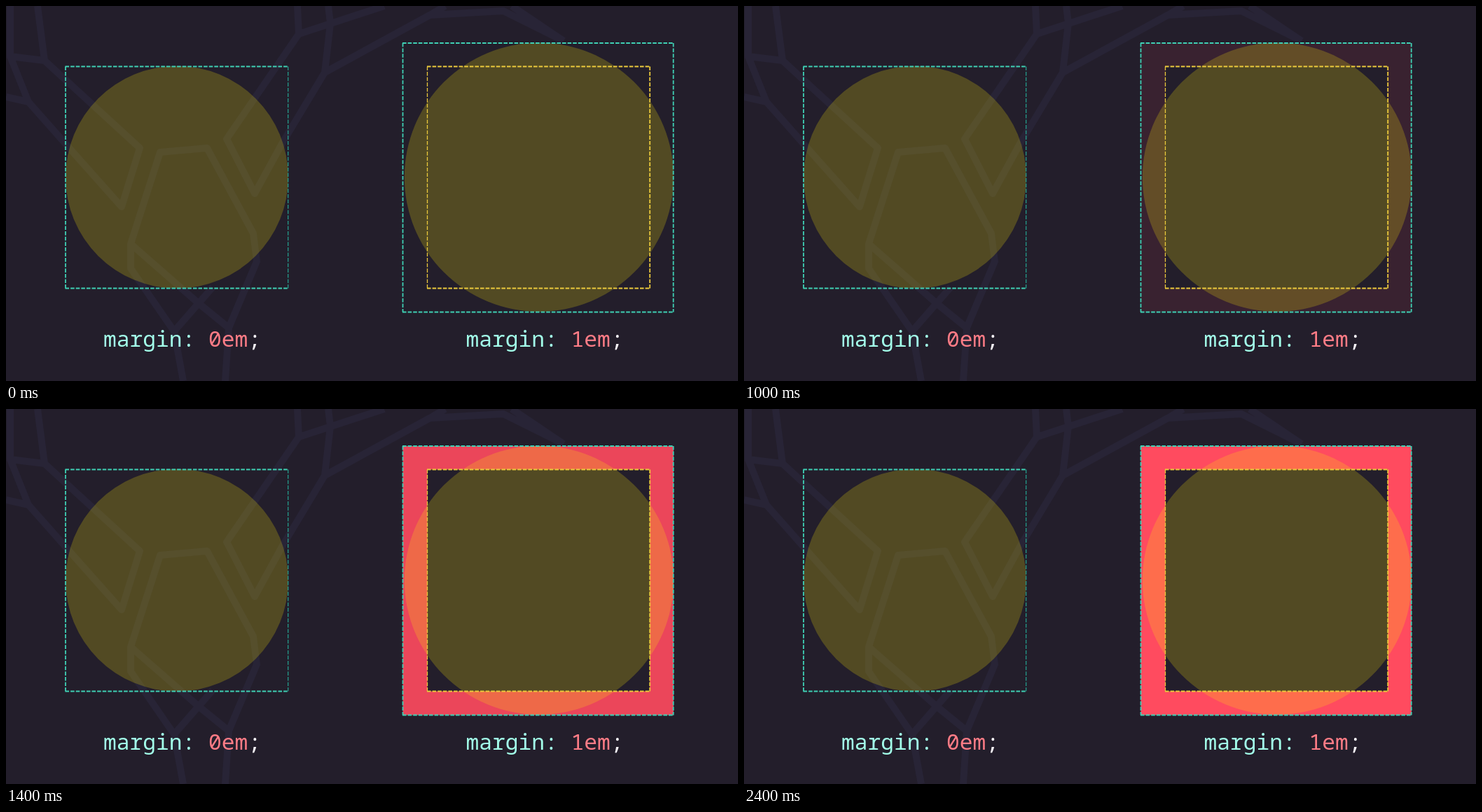
Write an HTML page that moves like this. It is 1045 px wide and 536 px high and loops after 3.4 s.

```html
<!DOCTYPE html>
<html lang="en">
<head>
<meta charset="utf-8">
<title>Margin and shape</title>
<style>
  html, body { margin: 0; width: 100%; height: 100%; overflow: hidden; background: #231e2b; }
  svg { display: block; width: 100%; height: 100%; }
  .web { fill: none; stroke: #282436; stroke-width: 10; stroke-linejoin: round; }
  .shape { fill: #f8e60a; fill-opacity: .22; }
  .edge { fill: none; stroke-width: 1.8; stroke-dasharray: 5.6 2; }
  .outer { stroke: #3fd0b4; }
  .inner { stroke: #ecca3c; }
  .thin { stroke-width: 1.3; }
  text { font: 350 31.25px "Roboto Mono", "Noto Sans Mono", monospace; fill: #a3ffea; white-space: pre; }
  .value { fill: #ff7c86; }
  .end { fill: #f4f1f6; }
</style>
</head>
<body>
<svg viewBox="0 0 1045 536" preserveAspectRatio="none">
  <path class="web" d="M6 0V72L55 78L45 0M6 72L32 137L0 130M32 137L85 197L165 287L191 203L55 78
    M416 0L418 40L540 0M418 40L315 190L355 268L395 195L455 95L463 25L460 0
    M455 95L605 13L627 0M605 13L710 7L796 50M722 0L796 50
    M178 340L220 209L287 203L353 325L358 365L318 460L275 425L178 340V375L240 465L295 402
    M240 465L253 536M318 460L313 536"/>

  <path id="margin" fill="#ff4b5f" fill-rule="evenodd" opacity="0"
    d="M566.5 53H953V437.5H566.5ZM601.5 86.5V403.5H919V86.5Z"/>

  <circle class="shape" cx="244" cy="244.7" r="159"/>
  <circle class="shape" cx="761" cy="244.7" r="192.2"/>

  <path class="edge outer" d="M84.5 86.5H403M84.5 403.5H403M85 86.5V403.5"/>
  <path class="edge thin" stroke="#259a89" d="M402.7 86.5V403.5"/>
  <path class="edge outer" d="M566 53H953.5M566 437.5H953.5M566.5 53V437.5M952.7 53V437.5"/>
  <path class="edge inner" d="M601 86.5H919.5M601 403.5H919.5M919.2 86.5V403.5"/>
  <path class="edge inner thin" d="M601.5 86.5V403.5"/>

  <text x="139" y="486.5">margin: <tspan class="value">0em</tspan><tspan class="end">;</tspan></text>
  <text x="656.5" y="486.5">margin: <tspan class="value">1em</tspan><tspan class="end">;</tspan></text>
</svg>
<script>
  const duration = 3400;
  // [time in ms, opacity held until the next step]
  const steps = [[0, 0], [1000, .1], [1200, .4], [1400, .91], [1600, 1], [duration, 1]];

  document.getElementById('margin').animate(
    steps.map(([time, opacity]) => ({ offset: time / duration, opacity, easing: 'step-end' })),
    { duration, iterations: Infinity }
  );
</script>
</body>
</html>
```
